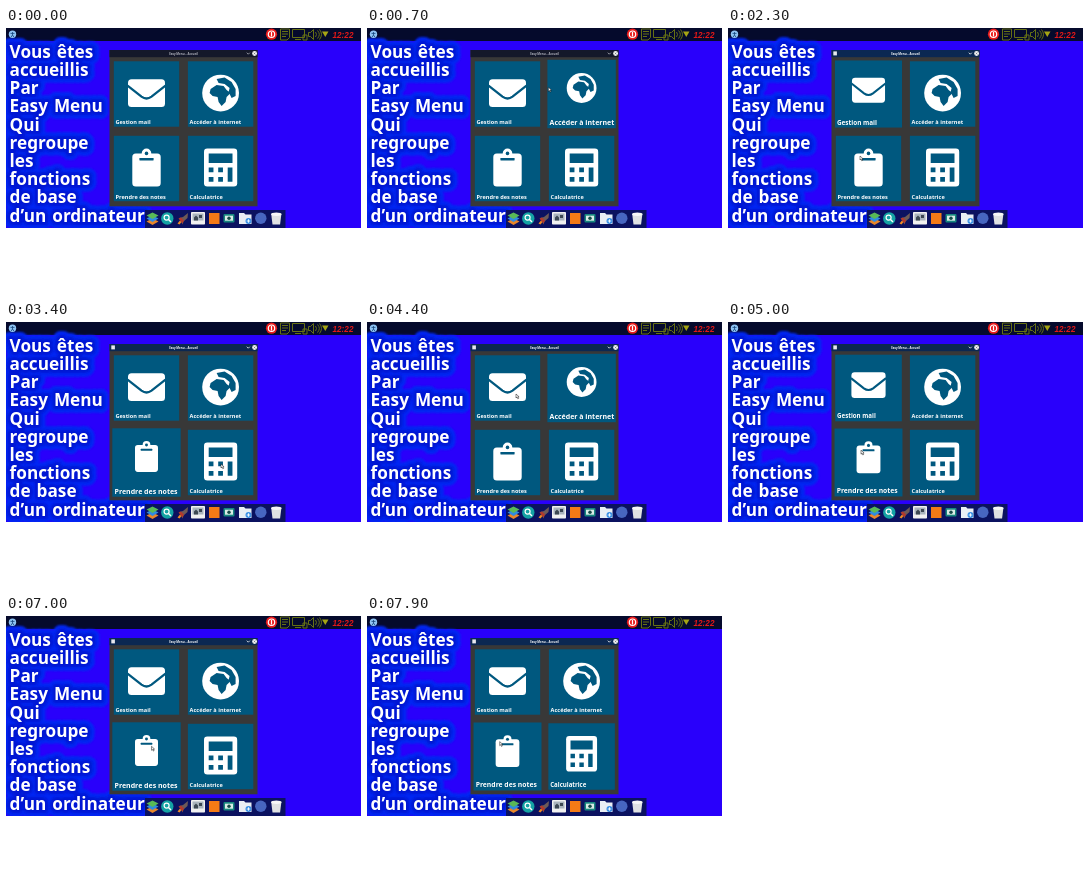
Animation of 355x266 px, one loop 8 s. Source, as an HTML page:

```html
<!DOCTYPE html>
<html lang="fr">
<head>
<meta charset="utf-8">
<title>Menu d'accueil</title>
<style>
html, body { margin: 0; width: 100%; height: 100%; overflow: hidden; background: #fff; }
svg { display: block; width: 100vw; height: 100vh; }
.intro { font: 600 17.2px "Noto Sans", "Open Sans", sans-serif; word-spacing: 1.5px; stroke-linejoin: round; }
.label { font-family: "Noto Sans", "Open Sans", sans-serif; font-weight: 600; fill: #fff; }
.title { font: 600 2.9px "Noto Sans", "Open Sans", sans-serif; text-anchor: middle; }
.clock { font: italic bold 8.2px "Liberation Sans", Arial, sans-serif; fill: #e01818; }
</style>
</head>
<body>
<svg viewBox="0 0 355 266" preserveAspectRatio="none">
  <defs>
    <filter id="blur" x="-20%" y="-20%" width="140%" height="140%"><feGaussianBlur stdDeviation="1.2"/></filter>
    <clipPath id="screen"><rect width="355" height="200"/></clipPath>
  </defs>
  <rect width="355" height="266" fill="#fff"/>
  <g clip-path="url(#screen)">
    <rect width="355" height="200" fill="#2900fb"/>
    <rect width="355" height="13" fill="#050a2c"/>
    <g id="halo" class="intro" fill="none" stroke="#0026f2" stroke-width="14" filter="url(#blur)"/>
    <g id="glow" class="intro" fill="none" stroke="#0418d4" stroke-width="6" filter="url(#blur)"/>

    <!-- top bar -->
    <circle cx="6.5" cy="6.3" r="3.7" fill="#8fc4f4"/>
    <path d="M4.5 5.4h4M6.5 4v3l-1.3 2M6.5 7l1.3 2" stroke="#15447c" stroke-width=".8" fill="none"/>
    <circle cx="265.5" cy="6.2" r="5.6" fill="#ea1c1c"/>
    <circle cx="265.5" cy="6.2" r="3.2" fill="none" stroke="#fff" stroke-width="1.2"/>
    <path d="M265.5 4v4.400" stroke="#fff" stroke-width="1.2"/>
    <g fill="none" stroke="#667014">
      <path d="M274.500 1h9v8.500l-2.500 2.500h-6.500zM276 3.500h6M276 6h6M276 8.500h4"/>
      <path d="M286.500 1.500h12v8h-12zM289 11.500h6M297 7h4v5h-4z"/>
      <path d="M302.500 4.500h2l3-3v10l-3-3h-2zM309.500 4q2 2.300 0 5M311.500 2.500q3.600 3.800 0 8M313.500 1.500q4 4.800 0 10"/>
    </g>
    <path d="M316 3.500h6.500l-3.200 5.500z" fill="#a5a414"/>
    <text class="clock" x="326.500" y="9.600">12:22</text>

    <!-- dock -->
    <rect x="139" y="182" width="140.500" height="18" fill="#0b1260"/>
    <g id="words" class="intro" fill="#fff"/>
    <path d="M140.500 193.500l6-3 6 3-6 3.500z" fill="#e8862a"/>
    <path d="M140.500 190.500l6-3 6 3-6 3.500z" fill="#2f8be0"/>
    <path d="M140.500 187.500l6-3 6 3-6 3.500z" fill="#59b957"/>
    <circle cx="161.300" cy="190.500" r="6.200" fill="#14a3a4"/>
    <circle cx="160.600" cy="189.600" r="2.500" fill="none" stroke="#fff" stroke-width="1.200"/>
    <path d="M162.500 191.500l2.500 2.500" stroke="#fff" stroke-width="1.400"/>
    <path d="M171.500 195.500l2.500-3 1.500 1.500-2 2.500z" fill="#f28b24"/>
    <path d="M173 190l4-1 5-4-.5 5-4 3.500-1 3-1.500-3z" fill="#6d5a58"/>
    <path d="M172.500 190.500l2.500-1 3 3-1.500 3z" fill="#b23a2c"/>
    <rect x="185" y="184" width="14" height="12.500" rx=".8" fill="#f1f1f1"/>
    <rect x="186.500" y="185.500" width="11" height="7" fill="#aab4bd"/>
    <path d="M188 192.500v-3l2-2 2 2v3zM193 187h3v3h-3z" fill="#3d4853"/>
    <rect x="203" y="185" width="10.500" height="11" fill="#f47a16"/>
    <rect x="217.500" y="186" width="11" height="8.500" rx="1" fill="#17877f"/>
    <rect x="219" y="187.700" width="8" height="5" fill="#d9ece6"/>
    <circle cx="223" cy="190.200" r="1.700" fill="#144a48"/>
    <path d="M233 185h5l1.500 1.500h6v9.500h-12.500z" fill="#e9eef4"/>
    <circle cx="242.500" cy="193" r="3" fill="#3a8fe4"/>
    <path d="M242.500 191.300v3.400M240.800 193h3.400" stroke="#fff" stroke-width=".9"/>
    <circle cx="254.800" cy="190.300" r="5.700" fill="#4766c0"/>
    <path d="M265.300 186.500h10l-1.200 10h-7.600z" fill="#dfe1e3"/>
    <ellipse cx="270.300" cy="186.200" rx="5.300" ry="1.700" fill="#f7f7f7"/>

    <!-- window -->
    <rect x="103.500" y="22" width="148" height="156.300" fill="#383838"/>
    <rect id="bar" x="103.500" y="22" width="148" height="7.200"/>
    <text id="title" class="title" x="177.500" y="26.500">Easy Menu – Accueil</text>
    <rect id="badge" x="105.300" y="23.400" width="3.600" height="4" fill="#e8e8ee"/>
    <path id="chevron" d="M240.800 24.700l1.500 1.500 1.500-1.500" fill="none" stroke-width=".8"/>
    <circle cx="248.600" cy="25.500" r="2.400" fill="#f2f2f2"/>
    <path d="M247.700 24.600l1.800 1.800m0-1.800l-1.800 1.800" stroke="#444a60" stroke-width=".5"/>
    <g id="tiles"></g>
    <path id="cursor" d="M0 0v4l1-.9.8 1.700.8-.4-.8-1.600h1.300z" fill="#fff" stroke="#111" stroke-width=".5"/>
  </g>
</svg>
<script>
const NS = "http://www.w3.org/2000/svg";
const LOOP = 8000, STEP = 100, FADE = 250, FOCUS = 1400, BLUE = "#00587f";
const $ = id => document.getElementById(id);

function set(el, attrs) {
  for (const k in attrs) el.setAttribute(k, attrs[k]);
}

function add(parent, tag, attrs = {}, text = "") {
  const el = document.createElementNS(NS, tag);
  set(el, attrs);
  el.textContent = text;
  return parent.appendChild(el);
}

const lines = ["Vous êtes", "accueillis", "Par", "Easy Menu", "Qui", "regroupe",
  "les", "fonctions", "de base", "d’un ordinateur"];
lines.forEach((line, i) => {
  for (const id of ["halo", "glow", "words"]) add($(id), "text", { x: 3.6, y: 29.8 + i * 18.2 }, line);
});

// Icons are centred on 0,0; cut-out parts take the tile colour.
const key = (x, y, h = 4.75) => `M${x} ${y}h4.75v${h}h-4.75z`;
const icons = {
  mail(g) {
    add(g, "rect", { x: -18.5, y: -13.9, width: 37, height: 27.8, rx: 3.5 });
    add(g, "path", { d: "M-19 -7.500L-5 3.500Q0 7.200 5 3.500L19 -7.500", fill: "none", stroke: BLUE, "stroke-width": 2.3 });
  },
  globe(g) {
    add(g, "circle", { r: 18.4 });
    add(g, "path", { fill: BLUE, d: "M-10 -4L-4 -8L3 -7L6 -3L10 0L6 4L5 9L1 13L-2 9L-3 4L-8 3L-11 0Z" });
    add(g, "path", { fill: BLUE, d: "M-4 -14L4 -15.500L11 -11L15 -4L15 3L11 5L8 -1L9 -5L4 -9L-2 -10Z" });
  },
  notes(g) {
    add(g, "rect", { x: -14.2, y: -14.2, width: 28.4, height: 33.2, rx: 3.5 });
    add(g, "circle", { cy: -14.2, r: 4.8 });
    add(g, "circle", { cy: -14.2, r: 1.8, fill: BLUE });
    add(g, "rect", { x: -7.1, y: -9.5, width: 14.2, height: 2.4, rx: .4, fill: BLUE });
  },
  calc(g) {
    add(g, "rect", { x: -16.6, y: -19, width: 33.2, height: 38, rx: 3.3 });
    const keys = [-11.9, -2.4].map(x => key(x, 0) + key(x, 9.5)).join("");
    add(g, "path", { fill: BLUE, d: "M-11.900 -14.200h23.800v9.500h-23.800z" + keys + key(7.1, 0, 14.25) });
  }
};

// spot: where the pointer rests in the tile
const tiles = {
  mail: { text: "Gestion mail", x: 140.5, y: 66, spot: [149, 72] },
  globe: { text: "Accéder à internet", x: 214.6, y: 66, spot: [205, 50] },
  notes: { text: "Prendre des notes", x: 140.5, y: 140.5, spot: [132, 128] },
  calc: { text: "Calculatrice", x: 214.6, y: 140.5, spot: [215, 142] }
};
for (const name in tiles) {
  const t = tiles[name];
  t.rect = add($("tiles"), "rect", { fill: BLUE });
  t.pic = add($("tiles"), "g", { fill: "#fff" });
  icons[name](t.pic);
  t.label = add($("tiles"), "text", { class: "label" }, t.text);
}

// The pointer's tour: each tile stays lit until the next entry.
const tour = [
  [250, "globe"], [850, "mail"], [2190, null], [2300, "notes"],
  [3400, "calc"], [4000, "globe"], [4400, "mail"], [4850, "notes"],
  [5500, "calc"], [5900, "globe"], [6250, "mail"], [6700, "notes"],
  [7250, "calc"], [7740, "notes"], [8200, "mail"]
].map(([at, tile]) => ({ at, tile }));
const stops = tour.filter(v => v.tile);

const clamp = v => Math.max(0, Math.min(1, v));
const mix = (a, b, k) => a + (b - a) * k;
const easeOut = k => 1 - (1 - k) ** 2;

function hover(name, t) {
  return Math.max(...tour.map((v, i) => {
    if (v.tile !== name) return 0;
    const end = tour[i + 1] ? tour[i + 1].at : LOOP;
    return easeOut(clamp((t - v.at) / FADE)) - clamp((t - end) / FADE);
  }));
}

// Lingers in a tile, then speeds off to the next one.
function pointer(t) {
  const i = Math.max(1, stops.findIndex(v => v.at > t));
  const a = stops[i - 1], b = stops[i];
  const k = clamp((t - a.at) / (b.at - a.at)) ** 3;
  return [0, 1].map(n => mix(tiles[a.tile].spot[n], tiles[b.tile].spot[n], k));
}

function draw(time) {
  const t = Math.floor(time / STEP) * STEP;
  for (const name in tiles) {
    const tile = tiles[name], h = hover(name, t), half = mix(32.7, 34.2, h);
    set(tile.rect, { x: tile.x - half, y: tile.y - half, width: half * 2, height: half * 2 });
    set(tile.pic, { transform: `translate(${tile.x} ${tile.y - mix(.9, 6, h)}) scale(${mix(1, .81, h)})` });
    set(tile.label, { x: tile.x - mix(31, 32, h), y: tile.y + mix(30, 31, h), "font-size": mix(5.6, 7, h) });
  }
  const active = t >= FOCUS, tone = active ? "#fff" : "#b4b6c0";
  set($("bar"), { fill: active ? "#0b2852" : "#14182a" });
  set($("title"), { fill: tone });
  set($("chevron"), { stroke: tone });
  set($("badge"), { opacity: active ? 1 : 0 });
  const [x, y] = pointer(t);
  set($("cursor"), { transform: `translate(${x} ${y})`, opacity: t < tour[0].at ? 0 : 1 });
}

const start = performance.now();
function tick() {
  draw((performance.now() - start) % LOOP);
  requestAnimationFrame(tick);
}
tick();
</script>
</body>
</html>
```
